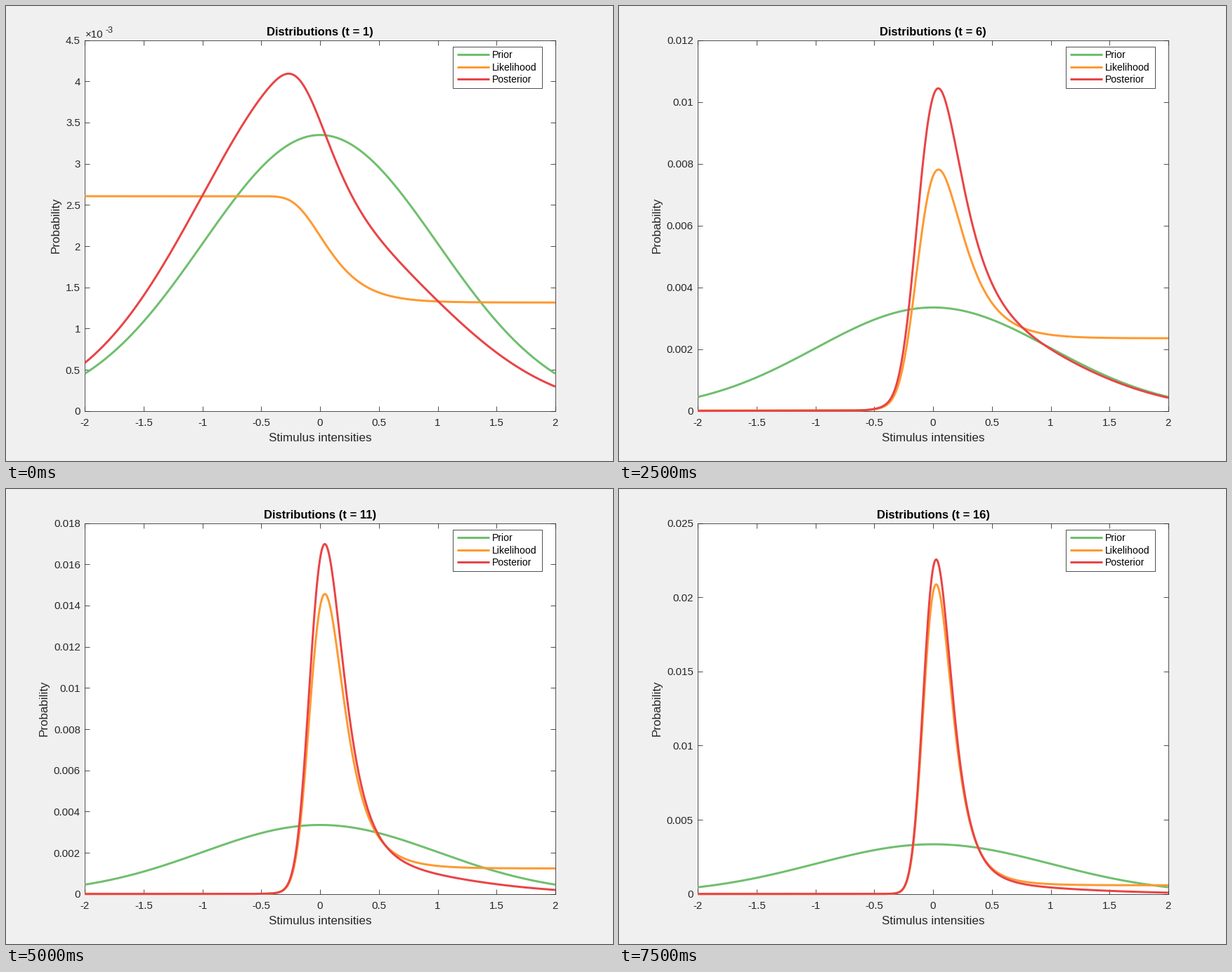
Write a matplotlib script that moves like this. It is 864 by 648 pixels and loops after 8000 ms.

```python
import math

import numpy as np
import matplotlib.pyplot as plt
from matplotlib.animation import FuncAnimation
from matplotlib.lines import Line2D
from matplotlib.patches import Rectangle

W, H = 864, 648
DARK = "#262626"
NAMES = ("Prior", "Likelihood", "Posterior")
COLORS = ("#6fbf6d", "#ff9930", "#e94446")

# Adaptive threshold estimation: each trial is placed at the posterior mode.
ANSWERS = "1010111011111110"
GUESS, LAPSE, SLOPE = 0.5, 0.01, 2
LEGEND_LEFT = {8}  # trials whose legend sits in the upper left corner

x = np.linspace(-2, 2, 500)


def unit(values):
    return values / values.sum()


def p_correct(stimulus):
    drive = 10 ** (SLOPE * (stimulus - x))
    return GUESS + (1 - GUESS - LAPSE) * (1 - np.exp(-drive))


def run_trials():
    prior = unit(np.exp(-x**2 / 2))
    like, post = np.ones_like(x), prior
    trials = []
    for answer in ANSWERS:
        p = p_correct(x[np.argmax(post)])
        like = unit(like * (p if answer == "1" else 1 - p))
        post = unit(prior * like)
        trials.append((prior, like, post))
    return trials


def nice_ticks(top):
    """Ticks from 0 past top, with at most ten steps of 1, 2 or 5."""
    base = 10.0 ** (math.floor(math.log10(top)) - 1)
    for step in (base * m for m in (1, 2, 5, 10)):
        count = math.ceil(top / step)
        if count <= 10:
            return step * np.arange(count + 1)


TRIALS = run_trials()

plt.rcParams["font.family"] = "Liberation Sans"
plt.rcParams["axes.unicode_minus"] = False
fig = plt.figure(figsize=(W / 72, H / 72), dpi=72, facecolor="#f0f0f0")
ax = fig.add_axes([0.13, 0.11, 0.775, 0.815], facecolor="white")


def label(px, py, text, size, **kw):
    kw = {"color": DARK, "va": "baseline", **kw}
    return fig.text(px / W, 1 - py / H, text, fontsize=size, **kw)


for spine in ax.spines.values():
    spine.set(color=DARK, linewidth=0.8)
ax.tick_params(direction="in", top=True, right=True, length=6.7, width=0.8,
               color=DARK, labelcolor=DARK, labelsize=15)
ax.tick_params(axis="x", pad=10.5)
ax.tick_params(axis="y", pad=6.5)
ax.set_xlim(-2, 2)
xticks = np.arange(-2, 2.1, 0.5)
ax.set_xticks(xticks, [f"{v:g}" for v in xticks])

curves = [ax.plot([], [], color=c, lw=3, zorder=4 + i, clip_on=False,
                  solid_capstyle="butt")[0] for i, c in enumerate(COLORS)]

title = label(447.2, 42.3, "", 16.6, weight="bold", color="black", ha="center")
label(447.2, 620, "Stimulus intensities", 17, ha="center")
ylabel = label(76, 312.5, "Probability", 17, rotation=90, ha="right",
               va="center", rotation_mode="default")
ylabel.set(rotation_mode="anchor", ha="center", va="baseline")
exponent = [label(113, 45, "×10", 15), label(141, 38.5, "-3", 12.5)]


def make_legend(left):
    def to_fig(px, py):
        return px / W, 1 - py / H

    parts = [Rectangle(to_fig(left, 116.5), 127.5 / W, 59 / H, fc="white",
                       ec=DARK, lw=0.8, transform=fig.transFigure, zorder=10)]
    fig.add_artist(parts[0])
    for i, (name, color) in enumerate(zip(NAMES, COLORS)):
        y = 69.2 + 17.6 * i
        (x0, y0), (x1, _) = to_fig(left + 6, y), to_fig(left + 52, y)
        key = Line2D([x0, x1], [y0, y0], color=color, lw=3, zorder=11,
                     solid_capstyle="butt", transform=fig.transFigure)
        fig.add_artist(key)
        text = label(left + 56, y + 5, name, 14, color="black", zorder=11)
        parts += [key, text]
    return parts


legend_right, legend_left = make_legend(635.5), make_legend(133.5)


def show(parts, on):
    for part in parts:
        part.set_visible(on)


def update(frame):
    t = frame + 1
    for curve, values in zip(curves, TRIALS[frame]):
        curve.set_data(x, values)

    ticks = nice_ticks(max(v.max() for v in TRIALS[frame]))
    scaled = ticks[-1] < 0.00999
    texts = [f"{v * (1000 if scaled else 1):g}" for v in ticks]
    ax.set_ylim(0, ticks[-1])
    ax.set_yticks(ticks, texts)
    show(exponent, scaled)

    widest = max(map(len, texts))
    ylabel.set_x({1: 89, 3: 76}.get(widest, 59) / W)
    title.set_text(f"Distributions (t = {t})")
    show(legend_left, t in LEGEND_LEFT)
    show(legend_right, t not in LEGEND_LEFT)
    return curves


anim = FuncAnimation(fig, update, frames=len(TRIALS), interval=500,
                     init_func=lambda: update(0), repeat=True, blit=False)
plt.show()
```
